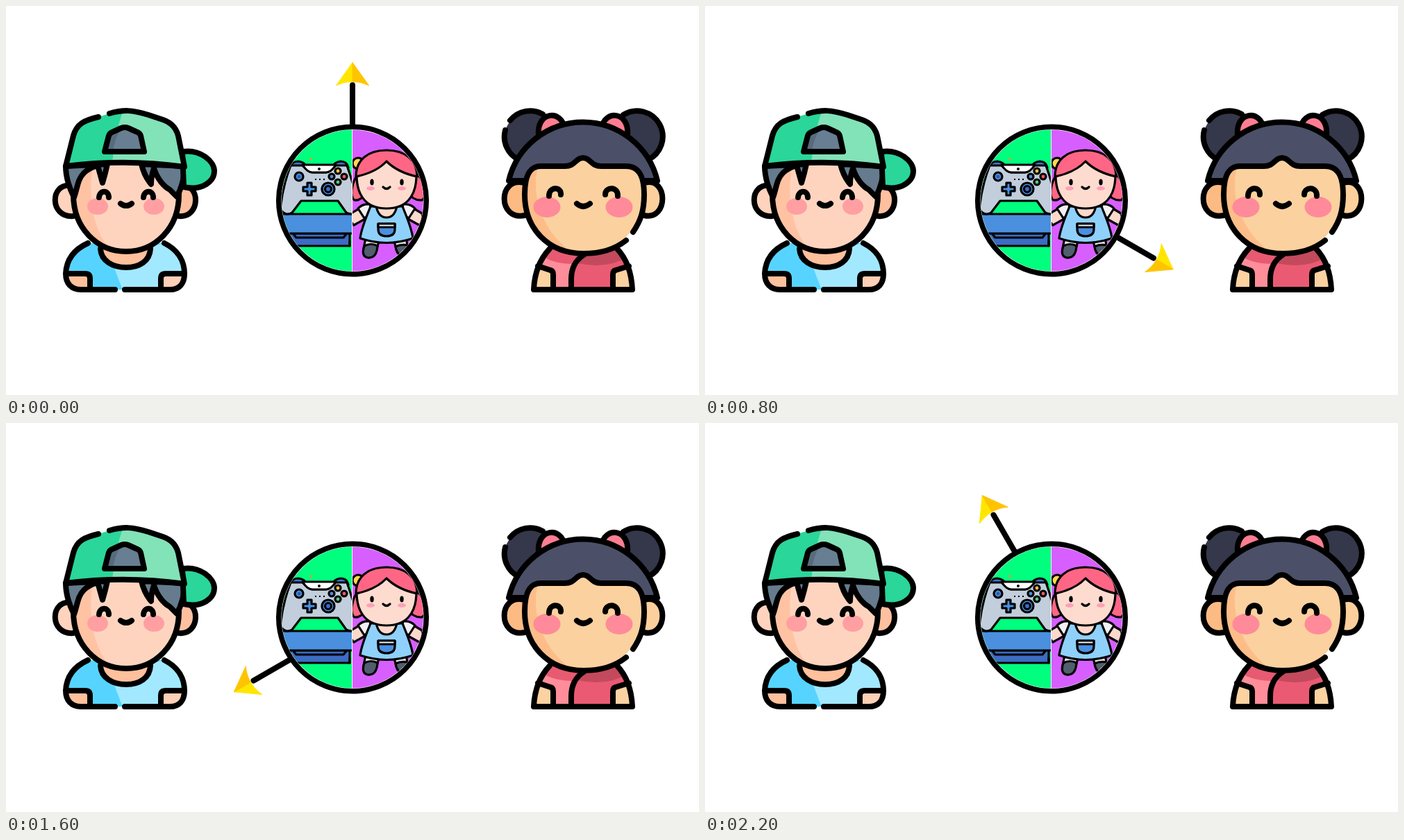
Recreate the animation shown at these times as an HTML page. Size 998 px wide and 561 px high, loop 2.4 s.

```html
<!DOCTYPE html>
<html lang="en">
<head>
<meta charset="utf-8">
<title>Spinner</title>
<style>
html, body { margin: 0; width: 100%; height: 100%; overflow: hidden; background: #fff; }
svg { display: block; width: 998px; height: 561px; }
.o { stroke: #000; stroke-width: 8; stroke-linecap: round; stroke-linejoin: round; }
.t { stroke: #000; stroke-width: 3.2; stroke-linecap: round; stroke-linejoin: round; }
.n { fill: none; }
</style>
</head>
<body>
<svg viewBox="0 0 998 561">
<defs>
  <clipPath id="disc"><circle cx="499" cy="280.5" r="102"/></clipPath>
  <clipPath id="left"><rect x="390" y="170" width="108" height="220"/></clipPath>
  <clipPath id="right"><rect x="499" y="170" width="110" height="220"/></clipPath>
  <clipPath id="boyFace"><path d="M97 225V276C97 320 131 354 173 354S249 320 249 276V225Z"/></clipPath>
  <clipPath id="girlFace"><path d="M747 272C747 243 755 231 770 231H805C820 231 820 219 831 219S842 231 857 231H893C910 231 919 243 919 272C919 320 880 357 832 357S747 320 747 272Z"/></clipPath>
  <clipPath id="cap"><path d="M86 231L97 187C102 170 112 165 133 160L149 155C170 149 182 150 205 157L226 164C241 169 247 179 249 192L257 232Q172 220 86 231Z"/></clipPath>
  <clipPath id="girlBody"><path d="M760 409C761 386 767 367 783 350H880C894 365 901 386 902 409Z"/></clipPath>
</defs>

<!-- boy -->
<g>
  <path fill="#56d4ff" d="M118 342C98 351 86 366 86 386L121 390V409H223V390L257 386C257 366 246 351 228 342Z"/>
  <path fill="#a2e8ff" d="M150 360Q160 390 168 409H223V390L257 386C257 366 246 351 228 342Z"/>
  <path fill="#ffc09c" d="M86 386H114Q121 386 121 393V409H108C94 409 86 400 86 386Z"/>
  <path fill="#ffcfb6" d="M257 386H230Q223 386 223 393V409H236C250 409 257 400 257 386Z"/>
  <path class="o" fill="#ffc09c" d="M136 350C137 368 154 377 173 377S207 368 208 350"/>
  <path class="o n" d="M118 342C98 351 87 366 86 386H114Q121 386 121 393V409M86 386C86 400 94 409 108 409H157M228 342C246 351 257 366 257 386H230Q223 386 223 393V409M257 386C257 400 250 409 236 409H171"/>
  <path class="o" fill="#ffd3bd" d="M94 259C63 254 62 306 97 303"/>
  <path class="o" fill="#ffc09f" d="M252 259C281 256 280 306 249 303"/>
  <g clip-path="url(#boyFace)">
    <rect x="90" y="220" width="165" height="140" fill="#ffd4bf"/>
    <path fill="#ffc3a3" d="M90 220H128C116 265 122 325 156 358H90Z"/>
  </g>
  <path class="o n" d="M97 272C97 320 131 354 173 354S249 320 249 272"/>
  <path class="o" fill="#667b8d" d="M86 231Q86 252 98 276C103 262 103 250 112 241Q119 234 132 230L139 255Q143 242 146 228Z"/>
  <path class="o" fill="#667b8d" d="M195 228Q199 245 209 257Q209 245 213 234C218 250 228 261 236 265L246 275Q257 255 257 231Z"/>
  <path class="o" fill="#2ad69a" d="M254 210C280 206 300 224 300 238C300 252 284 267 256 261Z"/>
  <g clip-path="url(#cap)">
    <rect x="80" y="145" width="180" height="92" fill="#2ad69a"/>
    <path fill="#82e2b8" d="M171 145Q157 178 152 237H262V145Z"/>
  </g>
  <path class="o n" d="M133 160C112 165 102 170 97 187L86 231Q172 220 257 232L249 192C247 179 241 169 226 164L205 157C182 150 170 149 149 155"/>
  <g id="hole">
    <path fill="#687e92" d="M142 210L148 187Q149 183 155 181L166 176Q171 174 176 176L187 181Q193 183 194 187L199 210Z"/>
    <path fill="#586b7d" d="M142 210L148 187L166 176Q156 193 154 210Z"/>
    <path class="o n" d="M142 210L148 187Q149 183 155 181L166 176Q171 174 176 176L187 181Q193 183 194 187L199 210Z"/>
  </g>
  <ellipse cx="132" cy="289" rx="15" ry="12" fill="#ff9fa2"/>
  <ellipse cx="213" cy="289" rx="15" ry="12" fill="#ff9fa2"/>
  <path class="o n" d="M134 276C135 265 148 265 148 276M198 276C199 265 212 265 212 276M165 285Q173 291 181 285"/>
</g>

<!-- girl -->
<g>
  <g clip-path="url(#girlBody)">
    <rect x="755" y="345" width="150" height="70" fill="#ff8d9a"/>
    <path fill="#ea5a73" d="M814 412V394C814 376 822 364 836 358L905 345V412Z"/>
    <path fill="#e85a72" d="M765 345H832L818 372Q788 372 771 360Z"/>
    <path fill="#c34a5c" d="M832 360L895 345V362Q865 380 824 371Z"/>
    <path fill="#fbd2a0" d="M755 372L788 383V412H755ZM907 372L874 383V412H907Z"/>
  </g>
  <path class="o n" d="M783 350C767 367 761 386 760 409H902C901 386 894 365 880 350M766 375L784 381Q788 382 788 387V409M897 375L878 381Q874 382 874 387V409M814 409V394C814 377 821 366 832 359"/>
  <circle cx="755" cy="189" r="37" fill="#35374a"/>
  <circle cx="908" cy="189" r="37" fill="#35374a"/>
  <path class="o n" d="M726 165A37 37 0 0 1 773 156M719 179A37 37 0 0 0 739 222M889 157A37 37 0 1 1 924 222"/>
  <path class="o" fill="#ff7d92" d="M767 186C764 152 800 149 804 176M858 176C862 149 898 152 895 186"/>
  <path class="o" fill="#fdbb84" d="M746 255C708 246 708 310 747 302"/>
  <path class="o" fill="#fbd09d" d="M920 255C954 246 954 310 919 302"/>
  <path class="o" fill="#4b5068" d="M747 252H724A110 110 0 0 1 938 252H919Z"/>
  <g clip-path="url(#girlFace)">
    <rect x="740" y="215" width="185" height="145" fill="#fbd1a0"/>
    <path fill="#fdbd89" d="M740 215H772C751 260 766 325 822 360H740Z"/>
  </g>
  <path class="o n" d="M893 338C878 350 858 357 832 357C780 357 747 320 747 272C747 243 755 231 770 231H805C820 231 820 219 831 219S842 231 857 231H893C910 231 919 243 919 272C919 295 914 310 903 326"/>
  <ellipse cx="779" cy="290" rx="19.500" ry="15" fill="#ff8a99"/>
  <ellipse cx="883" cy="290" rx="19.500" ry="15" fill="#ff8a99"/>
  <path class="o n" d="M782 274C782 260 800 260 799 272M863 272C863 260 882 260 881 274M822 285Q831 293 841 285"/>
</g>

<!-- pointer, drawn with its tip at 0,0 -->
<g id="arrow">
  <path d="M0 33V112" stroke="#000" stroke-width="8" stroke-linecap="round"/>
  <path fill="#ffe600" stroke="#ffe600" stroke-linejoin="round" d="M0 .5L-23.500 33.500Q-12 28 0 28Z"/>
  <path fill="#ffc400" stroke="#ffc400" stroke-linejoin="round" d="M0 .5L23.500 33.500Q12 28 0 28Z"/>
</g>

<!-- wheel -->
<circle cx="499" cy="280.500" r="106" fill="#fff"/>
<g clip-path="url(#disc)">
  <g clip-path="url(#left)">
    <rect x="390" y="170" width="108" height="220" fill="#00ff7f"/>
    <circle cx="439" cy="221" r="2" fill="#c7a63c"/>
    <path class="t" fill="#3c6cc3" d="M388 328H495V346H388Z"/>
    <path class="t" fill="#4a90df" d="M388 300H505V328H388Z"/>
    <path class="t n" d="M414 329L418 334H486L490 329M495 339V346"/>
    <path class="t" fill="#3f75c8" d="M409 233Q411 224 421 224Q430 225 433 232ZM470 232Q473 225 482 224Q491 224 493 233Z"/>
    <path class="t" fill="#c2cedc" d="M410 230H427Q435 238 441 240H461Q468 238 475 230H491C497 247 505 273 507 291Q501 304 490 298L478 281H425L412 298Q402 304 395 293C397 272 403 248 410 230Z"/>
    <path class="t" fill="#fff" d="M427 229H475Q468 240 461 240H441Q434 240 427 229Z"/>
    <circle cx="451" cy="235" r="2"/>
    <circle class="t" cx="422" cy="246" r="6" fill="#4a90df"/>
    <circle cx="422" cy="246" r="2.500" fill="#315ca8"/>
    <circle class="t" cx="464" cy="264" r="9" fill="#4a90df"/>
    <circle class="t" cx="464" cy="264" r="4.500" fill="#3c6cc3"/>
    <path class="t" fill="#4a90df" d="M434 255H440V261H446V267H440V273H434V267H428V261H434Z"/>
    <g class="t">
      <circle cx="478" cy="238" r="4" fill="#ffc23d"/>
      <circle cx="469" cy="246" r="4" fill="#4a90df"/>
      <circle cx="487" cy="246" r="4" fill="#f05a63"/>
      <circle cx="478" cy="254" r="4" fill="#4dca83"/>
    </g>
    <path d="M445 250h2m4 0h2m4 0h2" stroke="#000" stroke-width="2"/>
  </g>
  <g clip-path="url(#right)">
    <rect x="499" y="170" width="110" height="220" fill="#d75fff"/>
    <path class="t" fill="#ff6685" d="M513 238C499 246 493 275 502 280Q512 281 519 268ZM583 238C603 246 611 272 599 280Q586 281 578 268Z"/>
    <circle class="t" cx="507" cy="227" r="8" fill="#ffd84f"/>
    <path class="t" fill="#fdd9cc" d="M514 289L497 299Q494 310 501 316L519 306ZM582 289L599 299Q602 310 595 316L577 306Z"/>
    <path class="t" fill="#f4f1f4" d="M524 286Q513 285 507 292L516 306L527 300ZM572 286Q583 285 589 292L580 306L569 300Z"/>
    <path class="t" fill="#e5e1e7" d="M518 334L515 350H534L538 336ZM558 336L562 350H579L576 334Z"/>
    <path class="t" fill="#505e6d" d="M516 346Q511 361 521 363Q534 364 535 346Q526 341 516 346ZM561 347Q563 361 574 361Q584 358 578 345Q569 343 561 347Z"/>
    <path class="t" fill="#8fd1fb" d="M525 289C520 302 512 319 510 335Q548 348 586 335C584 319 576 302 571 289Z"/>
    <path class="t" fill="#fdd9cc" d="M533 288Q536 305 548 305T563 288Z"/>
    <path class="t" fill="#4a90df" d="M536 314H560V322Q560 332 548 332T536 322Z"/>
    <path class="t" fill="#e8f3fc" d="M536 314H560V319H536Z"/>
    <path class="t" fill="#fddccf" d="M505 244C505 276 521 292 548 292S591 276 591 244C588 224 570 214 548 214S508 224 505 244Z"/>
    <path class="t" fill="#ff6685" d="M504 246C504 222 521 208 548 208S592 222 592 246Q564 240 548 224Q533 240 504 246Z"/>
    <ellipse cx="527" cy="254" rx="2.700" ry="4.500"/>
    <ellipse cx="570" cy="254" rx="2.700" ry="4.500"/>
    <ellipse cx="525" cy="263" rx="6" ry="3" fill="#ff9fb6"/>
    <ellipse cx="570" cy="263" rx="6" ry="3" fill="#ff9fb6"/>
    <path class="t n" d="M543 261Q548 266 553 261"/>
  </g>
</g>
<circle cx="499" cy="280.500" r="106.300" fill="none" stroke="#000" stroke-width="7.500"/>
</svg>
<script>
const arrow = document.getElementById("arrow");
// tip position for each 30 degree tick
const tips = [
  [499, 81], [600, 104], [674.5, 177], [700, 282], [674.5, 380], [599, 457],
  [499, 480], [408, 457], [328, 388], [299, 288], [322, 180], [399, 104]
];

function draw() {
  const tick = Math.floor(performance.now() % 2400 / 200);
  arrow.setAttribute("transform", `translate(${tips[tick]}) rotate(${tick * 30})`);
  requestAnimationFrame(draw);
}
draw();
</script>
</body>
</html>
```
